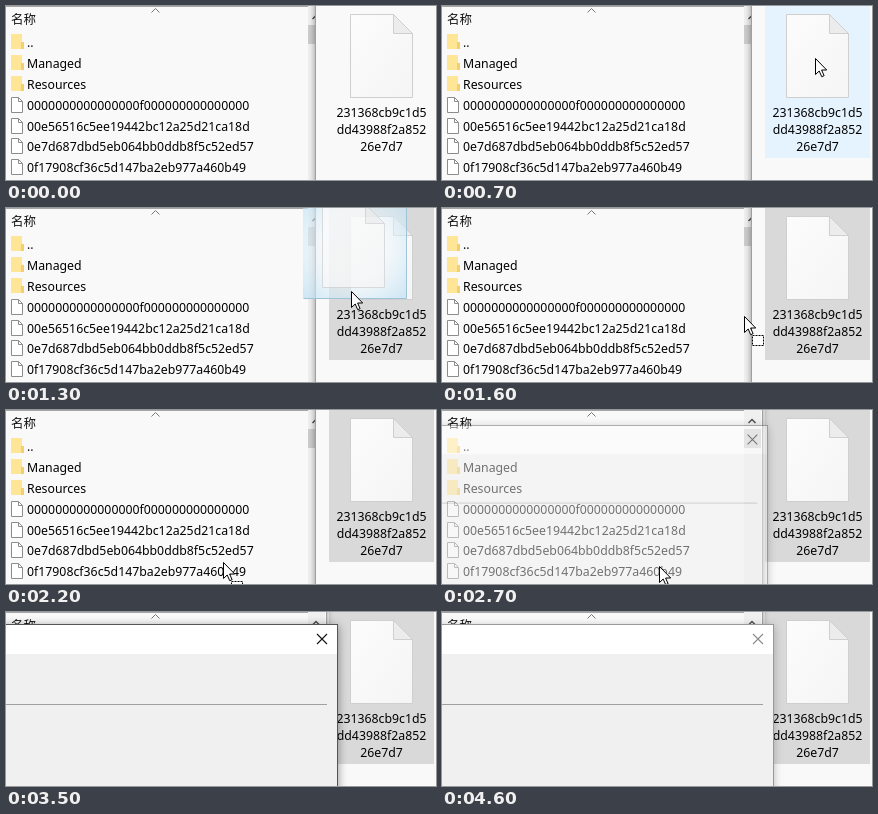
An HTML page that plays this animation: 430x174 px, repeating every 4.8 s.

```html
<!DOCTYPE html>
<html lang="zh">
<head>
<meta charset="utf-8">
<title>Drag a file into the list</title>
<style>
  html, body { margin: 0; width: 100%; height: 100%; overflow: hidden; background: #f9f9f9; }
  svg { display: block; width: 430px; height: 174px; }
  text { font: 12.3px "Noto Sans", "Open Sans", sans-serif; fill: #000; }
  .head { font: 12.5px "Noto Sans CJK SC", "Noto Sans CJK", sans-serif; fill: #111; }
  .label text { text-anchor: middle; }
  .pane { fill: #f9f9f9; stroke: #a0a0a0; filter: drop-shadow(0 0 3px rgba(0, 0, 0, .4)); }
  #shade { filter: drop-shadow(0 2px 5px rgba(0, 0, 0, .42)); }
  .idle #shade { filter: drop-shadow(0 2px 4px rgba(0, 0, 0, .25)); }
  #edge { stroke: #555; }
  .idle #edge { stroke: #999; }
  #close { stroke: #111; }
  .idle #close { stroke: #8a8a8a; }
</style>
</head>
<body>
<svg id="stage" viewBox="0 0 430 174">
  <defs>
    <linearGradient id="paper" x2="1" y2="1">
      <stop offset="0" stop-color="#fcfcfc"/>
      <stop offset="1" stop-color="#f5f5f5"/>
    </linearGradient>
    <radialGradient id="glass" r=".75">
      <stop offset=".4" stop-color="#f0f8fc" stop-opacity=".5"/>
      <stop offset="1" stop-color="#b4dcf2" stop-opacity=".75"/>
    </radialGradient>
    <g id="doc">
      <path d="M.5.5H43.5L62.5 19.5V83.5H.5Z" fill="url(#paper)" stroke="#cfcfcf"/>
      <path d="M43.5.5V19.5H62.5Z" fill="#ececec" stroke="#cfcfcf"/>
    </g>
    <g id="file">
      <path d="M.5.5H7.5L11.5 4.5V15.5H.5Z" fill="#fff" stroke="#8c8c8c"/>
      <path d="M7.5.5V4.5H11.5" fill="none" stroke="#8c8c8c"/>
    </g>
    <g id="folder">
      <path d="M0 0H11V8H13V15H0Z" fill="#ffe596"/>
      <path d="M10 8H13V15H10Z" fill="#f3cf6d"/>
    </g>
  </defs>

  <g id="list">
    <rect class="pane" x="-9.500" y="-9.500" width="330" height="194"/>
    <rect width="302" height="1" fill="#a5a5a5"/>
    <path d="M145.500 6.500L149.500 2.500L153.500 6.500" fill="none" stroke="#777"/>
    <text class="head" x="5" y="18">名称</text>
    <g id="rows"></g>
    <rect x="302" width="17" height="174" fill="#f0f0f0"/>
    <rect x="302" y="19" width="17" height="19" fill="#cdcdcd"/>
    <path d="M306.500 13L310 9.500L313.500 13" fill="none" stroke="#505050" stroke-width="1.500"/>
  </g>

  <g id="folderView">
    <rect class="pane" x="309.500" y="-9.500" width="140" height="194"/>
    <rect id="pick" x="323" width="105" height="152"/>
    <use href="#doc" x="344" y="8"/>
    <g class="label">
      <text x="375.500" y="111">231368cb9c1d5</text>
      <text x="375.500" y="128">dd43988f2a852</text>
      <text x="375.500" y="145">26e7d7</text>
    </g>
  </g>

  <g id="ghost">
    <rect x="-48" y="-95" width="104" height="103" rx="2" fill="url(#glass)"/>
    <path d="M-47.500 7.500H55.500V-95" fill="none" stroke="#9fc4d8"/>
    <use href="#doc" x="-29" y="-87" opacity=".7"/>
  </g>

  <g id="dialog">
    <rect id="shade" x="-69" y="12" width="401" height="200" fill="#fff"/>
    <rect x="-69" y="42" width="400" height="170" fill="#f0f0f0"/>
    <rect x="-69" y="92" width="390" height="1" fill="#a0a0a0"/>
    <rect id="edge" x="-68.500" y="12.500" width="400" height="199" fill="none"/>
    <path id="close" d="M311 22L321 32M321 22L311 32" stroke-width="1.100"/>
  </g>

  <g id="cursor">
    <path d="M.5.5V16.500L4.200 13L6.700 18.700L9.100 17.700L6.600 12H11.700Z" fill="#fff" stroke="#000"/>
    <rect id="badge" x="8.500" y="19.500" width="11" height="10" fill="#fff" stroke="#000" stroke-dasharray="2 1"/>
  </g>
</svg>
<script>
const LOOP = 4800, STEP = 100;
const $ = id => document.getElementById(id);

const names = ["..", "Managed", "Resources",
  "0000000000000000f000000000000000",
  "00e56516c5ee19442bc12a25d21ca18d",
  "0e7d687dbd5eb064bb0ddb8f5c52ed57",
  "0f17908cf36c5d147ba2eb977a460b49"];
$("rows").innerHTML = names.map((name, i) => {
  const y = Math.round(41.4 + 20.8 * i);
  const icon = i < 3 ? "folder" : "file";
  return `<use href="#${icon}" x="5" y="${y - 13}"/><text x="21" y="${y}">${name}</text>`;
}).join("");

// Pointer tip: [ms, x, y]
const path = [
  [300, 414, 118], [500, 391, 75], [700, 373, 52], [900, 371, 53],
  [1100, 363, 64], [1300, 345, 83], [1400, 333, 91], [1600, 302, 108],
  [2000, 248, 133], [2100, 226, 146], [2200, 217, 152], [2500, 217, 152],
  [2700, 217, 156], [3000, 218, 162], [3200, 218, 162], [3400, 218, 170],
  [3500, 218, 176]];

// Dialog: [ms, opacity, scale]
const fade = [[0, 0, .95], [2600, .15, .955], [2700, .47, .97],
  [2800, .8, .985], [2900, .96, .996], [3000, 1, 1]];

// Item highlight: [ms, colour]
const picks = [[0, "none"], [300, "#e5f3ff"], [900, "#cce8ff"], [1000, "#d9d9d9"]];

const held = (table, t) => table.filter(k => k[0] <= t).pop();
const show = (id, on) => $(id).setAttribute("visibility", on ? "visible" : "hidden");

function tip(t) {
  const next = path.findIndex(k => k[0] > t);
  if (next < 1) return path[next < 0 ? path.length - 1 : 0].slice(1);
  const [t0, x0, y0] = path[next - 1], [t1, x1, y1] = path[next];
  const p = (t - t0) / (t1 - t0);
  return [Math.round(x0 + (x1 - x0) * p), Math.round(y0 + (y1 - y0) * p)];
}

function draw(t) {
  const [x, y] = tip(t);
  const [, opacity, scale] = held(fade, t);
  const move = `translate(${x} ${y})`;
  $("cursor").setAttribute("transform", move);
  $("ghost").setAttribute("transform", move);
  show("cursor", t >= 300 && t < 3500);
  show("ghost", t >= 1000 && t < 1500);
  show("badge", t >= 1500 && t < 2600);
  $("pick").setAttribute("fill", held(picks, t)[1]);
  // The list window comes to the front with its dialog.
  $("stage").insertBefore($("list"), $(t >= 2600 ? "ghost" : "folderView"));
  const dialog = $("dialog");
  dialog.setAttribute("opacity", opacity);
  dialog.setAttribute("transform", `translate(131 112) scale(${scale}) translate(-131 -112)`);
  dialog.classList.toggle("idle", t >= 4600);
}

const start = performance.now();
function tick() {
  const t = (performance.now() - start) % LOOP;
  draw(Math.floor(t / STEP) * STEP);
  requestAnimationFrame(tick);
}
tick();
</script>
</body>
</html>
```
